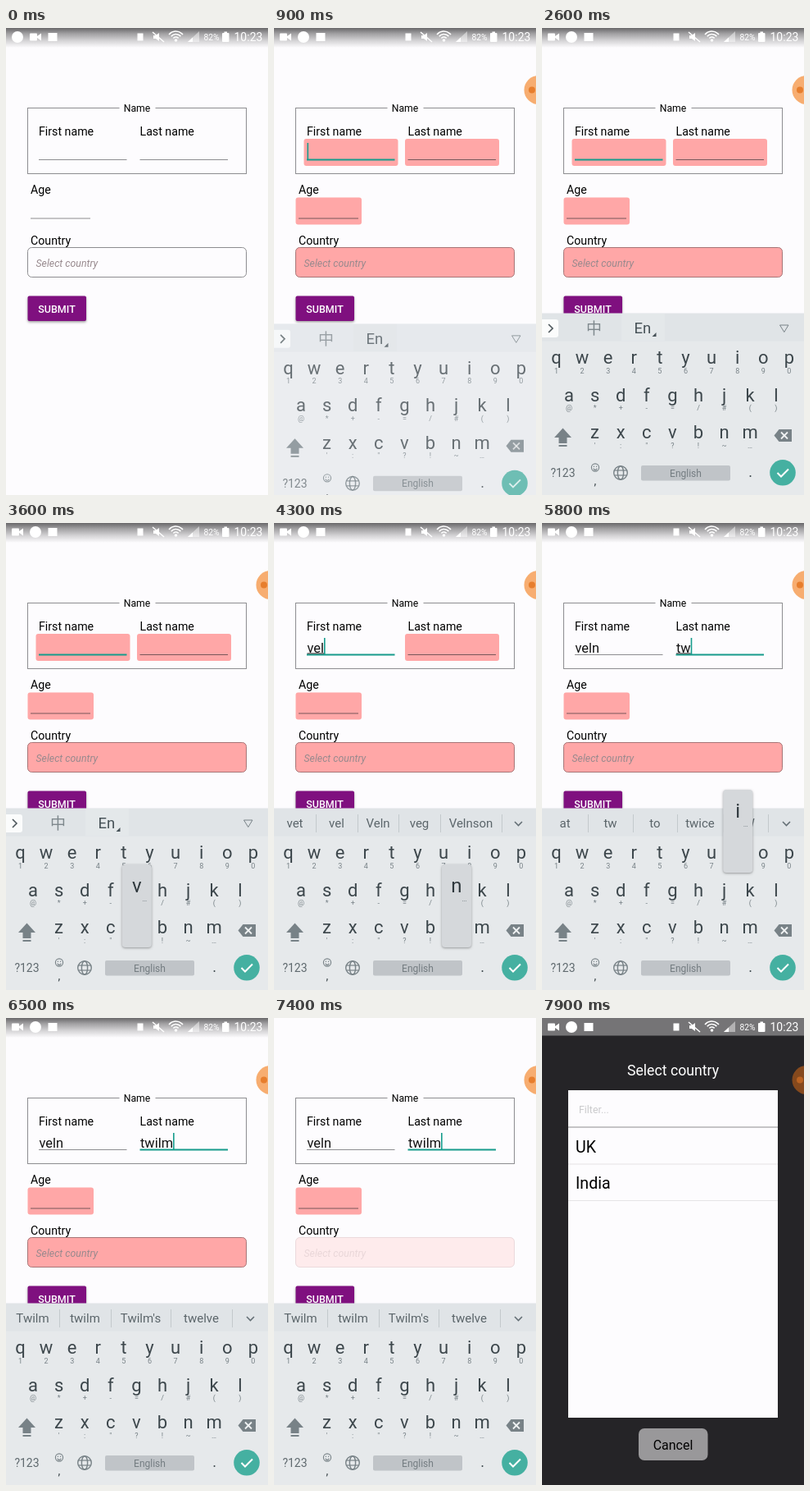
An HTML page with a canvas for the animation above (8 s loop, 320 by 569 pixels).

```html
<!DOCTYPE html>
<html lang="en">
<head>
<meta charset="utf-8">
<title>Form validation</title>
<style>
html, body { margin: 0; width: 100%; height: 100%; overflow: hidden; background: #fdfcfe; }
canvas { display: block; width: 320px; height: 569px; }
</style>
</head>
<body>
<canvas id="stage"></canvas>
<script>
const W = 320, H = 569, LOOP = 8000;
const PAPER = '#fdfcfe', RED = '#ffa7a7', TEAL = '#169c8c', GREY = '#8d8d90';
const INK = '#3d474c', SOFT = '#788287';
const canvas = document.getElementById('stage');
const ctx = canvas.getContext('2d');
const dpr = window.devicePixelRatio || 1;
canvas.width = W * dpr;
canvas.height = H * dpr;

// Key presses: letter, finger down, finger up
const FIRST = [['v', 3600, 3700], ['e', 3800, 3950], ['l', 4050, 4200], ['n', 4280, 4400]];
const LAST = [['t', 5300, 5400], ['w', 5550, 5700], ['i', 5780, 5900], ['l', 6000, 6100], ['m', 6270, 6400]];
const FOCUS = 700, NEXT = 4550, SHOW_ERRORS = 300, PICK = 7200, MODAL = 7500;

const EVEN = [56, 111, 165, 221, 276];
const HINTS = {
  v: [['v', 'via', 'very', 'V', 'visit'], EVEN],
  ve: [['be', 've', 'very', 'vet', 'verse'], EVEN],
  vel: [['vet', 'vel', 'Veln', 'veg', 'Velnson'], [51, 102, 152, 203, 278]],
  veln: [['Veln', 'veln', "Veln's", 'vein'], [65, 128, 201, 276]],
  t: [['t', 'to', 'the', 'T', 'this'], EVEN],
  tw: [['at', 'tw', 'to', 'twice', 'TW'], EVEN],
  twi: [['two', 'twi', 'twin', 'twist', 'TWI'], EVEN],
  twil: [['twin', 'twil', 'till', 'Twilm', 'twirl'], EVEN],
  twilm: [['Twilm', 'twilm', "Twilm's", 'twelve'], [65, 128, 201, 276]]
};
const ROWS = [
  { keys: 'qwertyuiop', marks: '1234567890', x: 17.5, base: 409 },
  { keys: 'asdfghjkl', marks: '@*+-=/#()', x: 33, base: 454.5 },
  { keys: 'zxcvbnm', marks: '\':"?!~…', x: 64.5, base: 500 }
];
const PITCH = 31.6;

const clamp = v => Math.max(0, Math.min(1, v));
const ramp = (t, a, b) => clamp((t - a) / (b - a));

function text(s, x, y, size, color, align = 'left', style = '') {
  ctx.font = `${style} ${size}px Roboto, "Noto Sans CJK SC", "Noto Sans CJK JP", sans-serif`;
  ctx.textAlign = align;
  ctx.fillStyle = color;
  ctx.fillText(s, x, y);
  return ctx.measureText(s).width;
}
function rect(x, y, w, h, color) {
  ctx.fillStyle = color;
  ctx.fillRect(x, y, w, h);
}
function round(x, y, w, h, r, fill, stroke) {
  ctx.beginPath();
  ctx.roundRect(x, y, w, h, r);
  if (fill) { ctx.fillStyle = fill; ctx.fill(); }
  if (stroke) { ctx.strokeStyle = stroke; ctx.lineWidth = 1; ctx.stroke(); }
}
function circle(x, y, r, fill, stroke, width = 1) {
  ctx.beginPath();
  ctx.arc(x, y, r, 0, Math.PI * 2);
  if (fill) { ctx.fillStyle = fill; ctx.fill(); }
  if (stroke) { ctx.strokeStyle = stroke; ctx.lineWidth = width; ctx.stroke(); }
}
function path(pts, color, width) {
  ctx.beginPath();
  for (let i = 0; i < pts.length; i += 2) ctx.lineTo(pts[i], pts[i + 1]);
  if (width) { ctx.strokeStyle = color; ctx.lineWidth = width; ctx.stroke(); }
  else { ctx.closePath(); ctx.fillStyle = color; ctx.fill(); }
}

const typed = (presses, t) => presses.filter(p => t >= p[2]).map(p => p[0]).join('');
const lastEdit = (presses, t, start) => presses.reduce((m, p) => t >= p[2] ? p[2] : m, start);

function statusBar(t) {
  const dark = t >= MODAL;
  if (dark) rect(0, 0, W, 21.5, '#757476');
  else {
    if (t >= 7400) return;
    const g = ctx.createLinearGradient(0, 0, 0, 24);
    g.addColorStop(0, '#69686a');
    g.addColorStop(0.3, '#a3a2a4');
    g.addColorStop(0.65, '#d5d4d6');
    g.addColorStop(1, PAPER);
    ctx.fillStyle = g;
    ctx.fillRect(0, 0, W, 24);
  }
  const c = '#fff';
  const swapped = t >= SHOW_ERRORS;
  const cam = swapped ? 14 : 36, dot = swapped ? 36 : 14;
  round(cam - 7, 6.5, 9, 9, 1, c);
  path([cam + 2, 10, cam + 7, 6.5, cam + 7, 15.5, cam + 2, 12], c);
  circle(dot, 11, 7, c);
  rect(51.5, 6, 11, 10, c);
  rect(160.5, 6.5, 7, 9, c);
  path([180, 9, 183, 9, 187, 6, 187, 16, 183, 13, 180, 13], c);
  path([179, 5, 193, 17], c, 1.5);
  for (const r of [4, 7.5, 11]) {
    ctx.beginPath();
    ctx.arc(207.5, 15, r, -Math.PI * 0.78, -Math.PI * 0.22);
    ctx.strokeStyle = c;
    ctx.lineWidth = 1.6;
    ctx.stroke();
  }
  circle(207.5, 15, 1.8, c);
  ctx.globalAlpha = 0.45;
  path([222, 17, 236, 17, 236, 4], c);
  ctx.globalAlpha = 1;
  path([222, 17, 228, 17, 228, 11.5], c);
  text('82%', 241.5, 15, 10.3, c);
  rect(266.5, 4.5, 3.5, 2, c);
  round(264, 6, 8.5, 11, 1, c);
  text('10:23', 278.5, 16.3, 14, c);
}

function bubble(t) {
  if (t < SHOW_ERRORS) return;
  const dark = t >= MODAL;
  circle(323, 75.5, 17.5, dark ? '#85491d' : '#f7ad70');
  circle(315, 75.5, 4, dark ? '#ba6322' : '#e77e2d');
}

function field(x, y, w, value, bad, focus, t, since, composing) {
  if (bad) round(x - 3.5, y - 25, w + 7.5, 33, 3, RED);
  const width = text(value, x + 0.5, y - 2.5, 16.4, '#111');
  if (focus) rect(x, y - 0.5, w, 2, TEAL);
  else rect(x, y, w, 1, bad ? '#77575a' : GREY);
  if (composing && value) rect(x + 0.5, y - 1.5, width, 1, '#222');
  if (focus && (t - since) % 1000 < 500) rect(x + 0.5 + width, y - 20, 1.6, 20, TEAL);
}

function form(t) {
  const bad = t >= SHOW_ERRORS;
  const first = typed(FIRST, t), last = typed(LAST, t);
  const onFirst = t >= FOCUS && t < NEXT, onLast = t >= NEXT;

  ctx.strokeStyle = GREY;
  ctx.lineWidth = 1;
  ctx.strokeRect(26.5, 97.5, 267, 80);
  rect(138.5, 94, 44, 8, PAPER);
  text('Name', 160, 102, 12.2, '#000', 'center');
  text('First name', 40, 131, 14.2, '#000');
  text('Last name', 163.5, 131, 14.2, '#000');
  text('Age', 30, 202.3, 14.2, '#000');
  text('Country', 30, 263.8, 14.2, '#000');

  field(40, 160, 107.5, first, bad && !first, onFirst, t, lastEdit(FIRST, t, FOCUS), onFirst);
  field(163.5, 160, 107.5, last, bad && !last, onLast, t, lastEdit(LAST, t, NEXT), t < 6400);
  field(30, 231.5, 73, '', bad, false, t, 0);

  ctx.globalAlpha = 1 - 0.8 * ramp(t, PICK, PICK + 180);
  round(26.5, 267.5, 267, 36, 5, bad ? RED : null, bad ? '#a67577' : GREY);
  text('Select country', 36.5, 291, 12.3, '#97898d', 'left', 'italic');
  ctx.globalAlpha = 1;

  const lift = ramp(t, 100, 200) * (1 - ramp(t, 300, 400));
  ctx.save();
  ctx.shadowColor = 'rgba(0,0,0,.38)';
  ctx.shadowBlur = (3 + 3 * lift) * dpr;
  ctx.shadowOffsetY = (1.5 + lift) * dpr;
  round(26.5, 326.5, 71.5, 30.5, 2, '#7f107f');
  ctx.restore();
  text('SUBMIT', 62, 346.8, 12.5, '#fff', 'center', '500');
}

function hintBar(word) {
  rect(0, 347.5, W, 34, '#e0e4e7');
  const hint = HINTS[word];
  if (!hint) {
    rect(97, 348, 53, 33, '#e4e8ea');
    round(-5, 355, 25, 22, 3, '#fbfcfc');
    path([8, 361, 13, 366, 8, 371], '#4d575c', 1.6);
    text('中', 63.5, 373, 19, '#7f888d', 'center');
    text('En', 112.5, 372, 18.5, '#465157');
    path([139.5, 371, 139.5, 376, 134.5, 376], '#465157');
    path([290.5, 362, 301, 362, 295.8, 370.5, 290.5, 362], SOFT, 1);
    return;
  }
  let left = 0;
  hint[0].forEach((s, i) => {
    const right = hint[1][i];
    text(s, (left + right) / 2, 371, 15, '#5b656a', 'center');
    rect(right, 355, 1, 22, '#c3c9cc');
    left = right;
  });
  path([294, 364, 298.5, 368.5, 303, 364], '#657076', 1.6);
}

function keyIcons() {
  path([25.5, 487.5, 36, 499, 30.5, 499, 30.5, 506, 20.5, 506, 20.5, 499, 15, 499], SOFT);
  rect(20.5, 508, 10, 2, SOFT);

  path([283.5, 496.5, 289.5, 489, 305, 489, 305, 504, 289.5, 504], SOFT);
  path([292, 492.5, 300, 500.5], '#f0f2f3', 1.8);
  path([300, 492.5, 292, 500.5], '#f0f2f3', 1.8);

  text('?123', 25.5, 547, 14, '#5f696e', 'center');

  circle(65, 535.5, 4.6, null, SOFT, 1.1);
  circle(63.4, 534.3, 0.7, SOFT);
  circle(66.6, 534.3, 0.7, SOFT);
  ctx.beginPath();
  ctx.arc(65, 536.2, 2.2, 0.2, Math.PI - 0.2);
  ctx.stroke();
  text(',', 65, 557, 14, INK, 'center');

  circle(96, 542, 8.3, null, SOFT, 1.4);
  ctx.beginPath();
  ctx.ellipse(96, 542, 3.6, 8.3, 0, 0, Math.PI * 2);
  ctx.stroke();
  path([88.5, 539, 103.5, 539], SOFT, 1.2);
  path([88.5, 545, 103.5, 545], SOFT, 1.2);

  round(121, 533, 109, 18.5, 2, '#c0c4c8');
  text('English', 175.5, 546.5, 12, '#747d82', 'center');
  text('.', 254.5, 547, 18, INK, 'center');

  circle(294, 541.8, 15.8, '#45b0a1');
  path([287.5, 542, 292, 546.5, 301, 537.5], '#fff', 2);
}

function popup(letter) {
  const row = ROWS.find(r => r.keys.includes(letter));
  const x = row.x + row.keys.indexOf(letter) * PITCH;
  const top = row.base + 17 - 101;
  ctx.save();
  ctx.shadowColor = 'rgba(0,0,0,.35)';
  ctx.shadowBlur = 3 * dpr;
  ctx.shadowOffsetY = dpr;
  round(x - 17.5, top, 36, 101, 4, '#d5d8db');
  ctx.restore();
  text(letter, x + 0.5, top + 33.5, 24, '#2f383d', 'center');
  text('…', x + 10, top + 45, 9, SOFT, 'center');
}

function keyboard(t) {
  if (t < FOCUS) return;
  const gone = ramp(t, MODAL, MODAL + 180);
  if (gone === 1) return;
  const rest = 1 - ramp(t, FOCUS, FOCUS + 400);
  ctx.save();
  ctx.globalAlpha = (1 - rest * rest) * (1 - gone);
  ctx.translate(0, 52 * rest * rest + 60 * gone * gone);
  rect(0, 381, W, H - 381, '#e6e9eb');
  hintBar(t < NEXT ? typed(FIRST, t) : typed(LAST, t));
  for (const r of ROWS) {
    [...r.keys].forEach((k, i) => {
      const x = r.x + i * PITCH;
      text(k, x, r.base, 22, INK, 'center');
      text(r.marks[i], x, r.base + 11.5, 9, SOFT, 'center');
    });
  }
  keyIcons();
  const down = [...FIRST, ...LAST].find(p => t >= p[1] && t < p[2]);
  if (down) popup(down[0]);
  ctx.restore();
}

function picker() {
  rect(0, 0, W, H, '#252427');
  text('Select country', 160, 70, 17.7, '#fff', 'center');
  rect(32, 88, 256, 399, PAPER);
  text('Filter...', 45, 115.5, 12.4, '#cbcbcd');
  rect(32, 132.5, 256, 1, '#8e8e90');
  text('UK', 41, 163.5, 19.6, '#000');
  rect(32, 177.5, 256, 1, '#e5e4e6');
  text('India', 41, 208, 19.6, '#000');
  rect(32, 222, 256, 1, '#e5e4e6');
  round(118, 500, 84.5, 39, 7, '#99989a');
  text('Cancel', 160, 525.5, 16, '#000', 'center');
}

function draw(t) {
  ctx.setTransform(dpr, 0, 0, dpr, 0, 0);
  rect(0, 0, W, H, PAPER);
  if (t < MODAL) form(t);
  else picker();
  statusBar(t);
  bubble(t);
  keyboard(t);
}

const start = performance.now();
function tick() {
  draw((performance.now() - start) % LOOP);
  requestAnimationFrame(tick);
}
tick();
</script>
</body>
</html>
```
